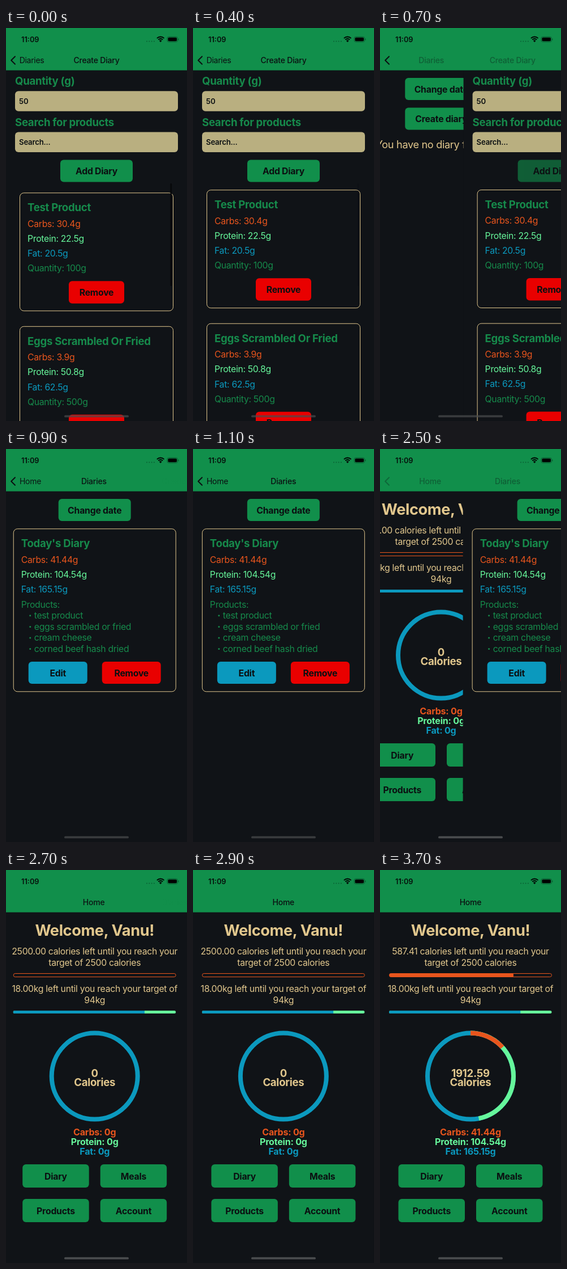
An HTML page that plays this animation: 320 by 693 pixels, repeating every 3800 ms.

```html
<!DOCTYPE html>
<html lang="en">
<head>
<meta charset="utf-8">
<title>Food diary</title>
<style>
  html, body { margin: 0; width: 100%; height: 100%; overflow: hidden; background: #101317; }
  svg { display: block; width: 100vw; height: 100vh; }
  text { font-family: Inter, "Liberation Sans", sans-serif; white-space: pre; }
  .body { font-size: 15.8px; letter-spacing: -.02em; }
  .note { font-size: 18.2px; letter-spacing: -.02em; }
  .head { font-size: 18.6px; font-weight: 700; letter-spacing: -.015em; }
  .btn { font-size: 15.8px; font-weight: 700; letter-spacing: -.015em; }
  .macro { font-size: 16.1px; font-weight: 700; letter-spacing: -.015em; }
  .field { font-size: 13.2px; font-weight: 600; letter-spacing: -.015em; }
  .hero { font-size: 27.2px; font-weight: 700; letter-spacing: -.015em; }
  .nav { font-size: 14px; letter-spacing: -.02em; }
  .title { font-size: 14px; font-weight: 500; letter-spacing: -.015em; }
  .clock { font-size: 12.8px; font-weight: 600; }
</style>
</head>
<body>
<svg id="stage" viewBox="0 0 320 693" preserveAspectRatio="none"></svg>
<script>
const C = {
  bg: '#101317', green: '#118f4b', word: '#168a4b', tan: '#e1c78d', field: '#b9af80',
  red: '#e90000', blue: '#0b99be', orange: '#e8551d', mint: '#66f69b', ink: '#0b0f11'
};
const LOOP = 3800, STEP = 100, W = 320;

// Markup helpers
const text = (s, x, y, cls, fill, mid = false, attrs = '') =>
  `<text x="${x}" y="${y}" class="${cls}" fill="${fill}"${mid ? ' text-anchor="middle"' : ''} ${attrs}>${s}</text>`;
const rect = (x, y, w, h, r, fill, attrs = '') =>
  `<rect x="${x}" y="${y}" width="${w}" height="${h}" rx="${r}" fill="${fill}" ${attrs}/>`;
const group = (id, inner) => `<g id="${id}">${inner}</g>`;
const button = (s, x, y, w, h, fill = C.green) =>
  rect(x, y, w, h, 6, fill) + text(s, x + w / 2, y + h / 2 + 6, 'btn', C.ink, true);
const frame = (x, y, w, h) => rect(x, y, w, h, 7, 'none', `stroke="${C.tan}"`);
const page = (id, inner) => group(id, rect(0, 74, W, 619, 0, C.bg) + inner);
const lines = (rows, x, y, step) => rows.map(([s, fill], i) => text(s, x, y + i * step, 'body', fill)).join('');

function productCard(y, name, carbs, protein, fat, amount) {
  return frame(24.5, y + .5, 271, 208) +
    text(name, 38, y + 33, 'head', C.word) +
    lines([[`Carbs: ${carbs}g`, C.orange], [`Protein: ${protein}g`, C.mint],
      [`Fat: ${fat}g`, C.blue], [`Quantity: ${amount}g`, C.word]], 38, y + 60.3, 26.3) +
    button('Remove', 111, y + 156, 98, 39.5, C.red);
}

const input = (s, y) => rect(16, y, 288, 35.5, 6, C.field) + text(s, 23, y + 22.7, 'field', C.ink);

const createPage = page('create',
  text('Quantity (g)', 16, 100, 'head', C.word) + input('50', 111.3) +
  text('Search for products', 16, 172.5, 'head', C.word) + input('Search...', 183.5) +
  group('add', button('Add Diary', 96, 232.5, 128, 39)) +
  group('list',
    productCard(285, 'Test Product', '30.4', '22.5', '20.5', 100) +
    productCard(520.5, 'Eggs Scrambled Or Fried', '3.9', '50.8', '62.5', 500)) +
  rect(290.5, 274, 2.6, 181, 1.3, '#07080a', 'id="scrollbar"'));

const foods = ['test product', 'eggs scrambled or fried', 'cream cheese', 'corned beef hash dried'];
const diariesPage = page('diaries',
  button('Change date', 96, 88, 128, 39) +
  group('empty', button('Create diary', 96, 140.5, 128, 39) +
    text('You have no diary for today!', 160, 212, 'note', C.tan, true)) +
  group('today', frame(16.5, 140.8, 287, 287) +
    text("Today's Diary", 30, 173, 'head', C.word) +
    lines([['Carbs: 41.44g', C.orange], ['Protein: 104.54g', C.mint],
      ['Fat: 165.15g', C.blue], ['Products:', C.word]], 30, 200.7, 26.3) +
    foods.map((s, i) => `<circle cx="46" cy="${293.8 + i * 19.6}" r="1.5" fill="${C.word}"/>` +
      text(s, 53, 299 + i * 19.6, 'body', C.word)).join('') +
    button('Edit', 43, 375, 104, 39, C.blue) + button('Remove', 173, 375, 104, 39, C.red)));

const ring = (id, color) =>
  `<circle id="${id}" cx="160" cy="363.5" r="76" fill="none" stroke="${color}" stroke-width="8" pathLength="1" transform="rotate(-90 160 363.5)"/>`;
const mid = (id, y, cls, fill, s = '') => text(s, 160, y, cls, fill, true, id && `id="${id}"`);

const homePage = page('home',
  mid('', 116, 'hero', C.tan, 'Welcome, Vanu!') +
  mid('left', 149.3, 'body', C.tan) + mid('', 168.7, 'body', C.tan, 'target of 2500 calories') +
  rect(16.5, 182.5, 287, 6, 3, 'none', `stroke="${C.orange}"`) +
  rect(16.5, 182.5, 0, 6, 2, C.orange, 'id="bar"') +
  mid('', 215, 'body', C.tan, '18.00kg left until you reach your target of') + mid('', 234.5, 'body', C.tan, '94kg') +
  rect(16, 248, 287.5, 5, 2.5, C.mint) +
  `<path d="M248.3 248H18.5a2.5 2.5 0 0 0 0 5H248.3z" fill="${C.blue}"/>` +
  ring('fatRing', C.blue) + ring('proteinRing', C.mint) + ring('carbRing', C.orange) +
  mid('total', 364.5, 'head', C.tan) + mid('', 381, 'head', C.tan, 'Calories') +
  mid('carbs', 468.3, 'macro', C.orange) + mid('protein', 484.9, 'macro', C.mint) + mid('fat', 501.5, 'macro', C.blue) +
  ['Diary', 'Meals', 'Products', 'Account'].map((s, i) =>
    button(s, i % 2 ? 170 : 32.5, i < 2 ? 519 : 580, 117.5, 41)).join(''));

const arc = r => `<path d="M${273.2 - r * .7} ${24.6 - r * .72}A${r} ${r} 0 0 1 ${273.2 + r * .7} ${24.6 - r * .72}" fill="none" stroke="#000" stroke-width="1.9"/>`;
const header = rect(0, 0, W, 74.6, 0, C.green) +
  text('11:09', 27, 25, 'clock', '#06100b') +
  [249, 253.3, 257.6, 261.9].map(x => `<circle cx="${x}" cy="23.6" r="1" fill="#0b6134"/>`).join('') +
  arc(9) + arc(5.6) + '<path d="M273.2 25l-2.3-2.6a3.3 3.3 0 0 1 4.6 0z"/>' +
  rect(285, 15.4, 18.4, 9.2, 2.8, 'none', 'stroke="#0a5a30" stroke-width=".9"') +
  rect(286.4, 16.8, 15.6, 6.4, 1.6, '#000') + rect(304.3, 18.4, 1.1, 3.2, .5, '#0a5a30') +
  `<path id="chevron" d="M16 50.3L9.2 57l6.8 6.7" fill="none" stroke="${C.ink}" stroke-width="2" stroke-linecap="round" stroke-linejoin="round"/>` +
  mid('titleOut', 62, 'title', C.ink) + mid('titleIn', 62, 'title', C.ink) +
  mid('backOut', 62, 'nav', C.ink) + text('', 24, 62, 'nav', C.ink, false, 'id="backIn"');

document.getElementById('stage').innerHTML = homePage + diariesPage + createPage + header +
  rect(103, 682.8, 114, 3.8, 1.9, '#4a4c4e', 'id="indicator"');

const el = {};
document.querySelectorAll('[id]').forEach(e => el[e.id] = e);
const set = (id, attrs) => { for (const k in attrs) el[id].setAttribute(k, attrs[k]); };
const write = (id, s) => { if (el[id].textContent !== s) el[id].textContent = s; };
const clamp = v => Math.min(1, Math.max(0, v));

// Critically damped spring, 0 to 1
function spring(ms, rate = 18.26) {
  const k = rate * Math.max(0, ms) / 1000;
  return 1 - Math.exp(-k) * (1 + k);
}

// Linear interpolation through [time, value] steps
function track(t, steps) {
  const i = steps.findIndex(s => s[0] > t);
  if (i < 0) return steps[steps.length - 1][1];
  if (!i) return steps[0][1];
  const [t0, a] = steps[i - 1], [t1, b] = steps[i];
  return a + (b - a) * (t - t0) / (t1 - t0);
}

const pops = [
  { at: 614.7, from: 'Create Diary', to: 'Diaries', back: 'Home', start: 45.5, shift: 161 },
  { at: 2415.2, from: 'Diaries', to: 'Home', back: '', start: 42.5, shift: 143 }
];

function drawHeader(pop, p) {
  const x = pop.start + (160 - pop.start) * Math.pow(p, 1.2);
  write('titleOut', pop.from);
  write('titleIn', pop.to);
  write('backOut', pop.to);
  write('backIn', pop.back);
  set('titleOut', { x: 160 + pop.shift * p, opacity: Math.pow(1 - p, 1.6) });
  set('titleIn', { x, opacity: Math.pow(p, 1.3) });
  set('backOut', { x, opacity: clamp(1 - 3 * p) });
  set('backIn', { opacity: clamp(2 * p - 1) });
  set('chevron', { opacity: pop.back ? 1 : Math.pow(1 - p, 2) });
}

const macros = [41.44, 104.54, 165.15];
const sum = macros.reduce((a, b) => a + b);

function drawHome(t) {
  const loaded = t >= 3000;
  const [carbs, protein, fat] = loaded ? macros : [0, 0, 0];
  const total = loaded ? 1912.59 : 0;
  const visibility = loaded ? 'visible' : 'hidden';
  write('left', `${(2500 - total).toFixed(2)} calories left until you reach your`);
  write('total', String(total));
  write('carbs', `Carbs: ${carbs}g`);
  write('protein', `Protein: ${protein}g`);
  write('fat', `Fat: ${fat}g`);
  set('bar', { width: 287 * total / 2500 * spring(t - 2960, 16) });
  set('carbRing', { 'stroke-dasharray': `${carbs / sum} 2`, visibility });
  set('proteinRing', { 'stroke-dasharray': `${(carbs + protein) / sum} 2`, visibility });
}

function draw(t) {
  const [p1, p2] = pops.map(pop => spring(t - pop.at));
  const move = (id, x, y = 0) => set(id, { transform: `translate(${x} ${y})` });
  move('create', W * p1);
  move('diaries', t < 2000 ? -.3 * W * (1 - p1) : W * p2);
  move('home', -.3 * W * (1 - p2));

  move('list', 0, 5.3 * (1 - spring(t - 50, 14)));
  set('scrollbar', { opacity: track(t, [[150, 1], [450, 0]]) });
  set('add', { opacity: track(t, [[400, 1], [520, .35], [600, .35], [700, .6], [850, 1]]) });
  set('indicator', { opacity: track(t, [[2400, .7], [2500, 1]]) });

  const ready = t >= 900;
  set('empty', { visibility: ready ? 'hidden' : 'visible' });
  set('today', { visibility: ready ? 'visible' : 'hidden' });

  if (t < 2400) drawHeader(pops[0], p1);
  else drawHeader(pops[1], p2);
  drawHome(t);
}

const began = performance.now() - 16;
function tick() {
  const t = (performance.now() - began) % LOOP;
  draw(Math.floor(t / STEP) * STEP);
  requestAnimationFrame(tick);
}
tick();
</script>
</body>
</html>
```
